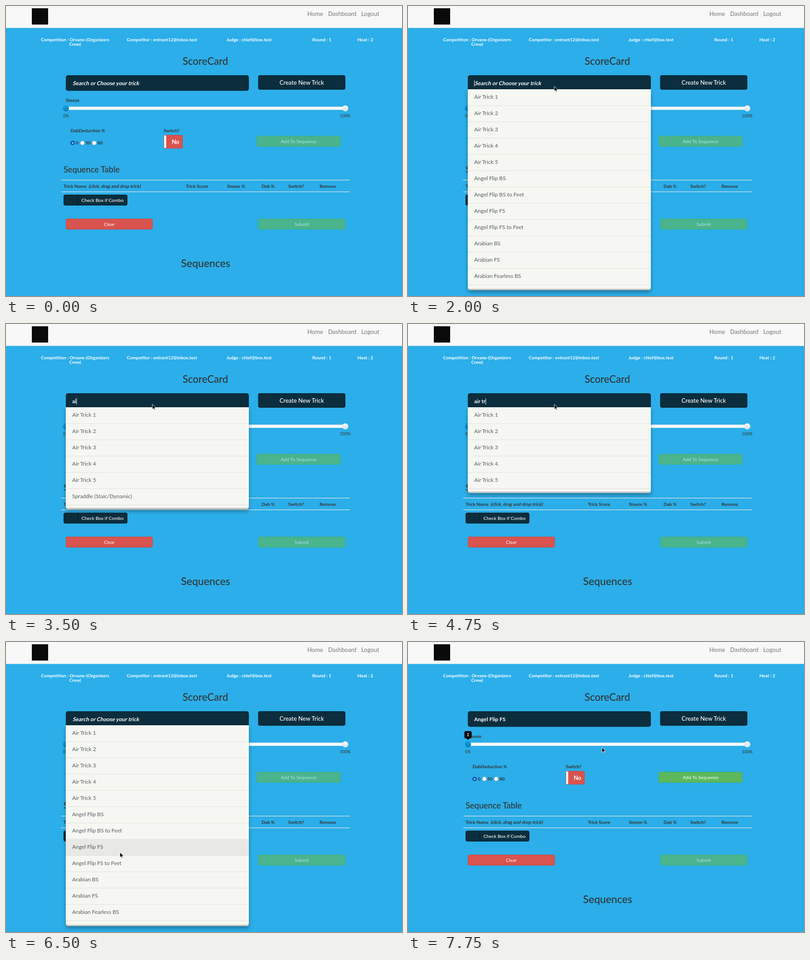
An HTML page for the animation above (8000 ms loop, 874 by 641 pixels).

```html
<!DOCTYPE html>
<html lang="en">
<head>
<meta charset="utf-8">
<title>ScoreCard</title>
<style>
  html, body { margin: 0; width: 100%; height: 100%; overflow: hidden; background: #2baee9; }
  svg { display: block; }
  text { font-family: Lato, "Open Sans", sans-serif; fill: #333; white-space: pre; }
</style>
</head>
<body>
<svg id="stage" width="874" height="641" viewBox="0 0 874 641">
  <defs>
    <linearGradient id="blueKnob" x2="0" y2="1"><stop stop-color="#149bdf"/><stop offset="1" stop-color="#0480be"/></linearGradient>
    <linearGradient id="greyKnob" x2="0" y2="1"><stop stop-color="#f4f6f7"/><stop offset="1" stop-color="#d3e3ec"/></linearGradient>
    <linearGradient id="track" x2="0" y2="1"><stop stop-color="#f3f3f3"/><stop offset="1" stop-color="#fff"/></linearGradient>
    <filter id="shadow" x="-10%" y="-10%" width="120%" height="125%">
      <feDropShadow dx="0" dy="5" stdDeviation="4.5" flood-color="#000" flood-opacity=".3"/>
    </filter>
  </defs>
</svg>
<script>
const NS = 'http://www.w3.org/2000/svg';
const stage = document.getElementById('stage');
const DARK = '#0c2d3d', RED = '#d9534f', GREEN = '#5cb85c';
const LOOP = 8000, ROW = 36, LIST_TOP = 184, MAX_ROWS = 12;

function add(tag, attrs, parent = stage) {
  const el = document.createElementNS(NS, tag);
  for (const key in attrs) el.setAttribute(key, attrs[key]);
  return parent.appendChild(el);
}
const group = (parent = stage) => add('g', {}, parent);
const rect = (x, y, width, height, fill, rx = 0, parent = stage, more = {}) =>
  add('rect', { x, y, width, height, fill, rx, ...more }, parent);
const circle = (cx, cy, r, fill, more = {}) => add('circle', { cx, cy, r, fill, ...more });

function label(x, y, size, content, attrs = {}, parent = stage) {
  const el = add('text', { x, y, 'font-size': size, ...attrs }, parent);
  el.textContent = content;
  return el;
}
const BOLD = { 'font-weight': 700 };
const MID = { 'text-anchor': 'middle' };
const paint = fill => ({ style: `fill:${fill}` });
const WHITE = paint('#fff');
const slanted = (x, y, size, content, attrs, parent) =>
  label(0, 0, size, content, { ...BOLD, ...attrs, transform: `translate(${x} ${y}) skewX(-13)` }, parent);

function button(x, y, width, height, fill, border, size, caption, weight = 400) {
  const g = group();
  rect(x + .5, y + .5, width - 1, height - 1, fill, 3, g, { stroke: border });
  label(x + width / 2, y + height / 2 + size * .36, size, caption, { ...MID, ...WHITE, 'font-weight': weight }, g);
  return g;
}
const show = (el, on) => el.setAttribute('visibility', on ? 'visible' : 'hidden');

// Navigation bar
rect(0, 0, 874, 641, '#2baee9');
rect(0, 0, 874, 48, '#f8f8f8');
rect(0, 48, 874, .6, '#d5e5ec');
rect(57, 5, 36, 36, '#0a0a0a');
[[665, 'Home'], [711, 'Dashboard'], [784, 'Logout']]
  .forEach(([x, s]) => label(x, 21.5, 13.1, s, paint('#777')));

// Heat details
[
  [152.5, 78, 'Competition : Orvane-(Organizers'], [152.5, 88, 'Crew)'],
  [344, 78, 'Competitor : entrant12@inbox.test'], [536.5, 78, 'Judge : chief@box.test'],
  [697, 78, 'Round : 1'], [793, 78, 'Heat : 2'],
].forEach(([x, y, s]) => label(x, y, 10, s, { ...MID, ...BOLD, ...WHITE }));

label(440, 130, 22.2, 'ScoreCard', { ...MID, 'font-weight': 500 });

// Search field
rect(132, 153, 404, 34.5, DARK, 5);
const field = group();
const placeholder = slanted(147, 175, 12, 'Search or Choose your trick', WHITE, field);
const entry = label(146, 175, 12, '', { ...BOLD, ...WHITE }, field);
const caret = rect(146, 164, 1, 14, '#fff', 0, field);
button(556.5, 153, 192.5, 32, DARK, '#08222f', 13, 'Create New Trick', 500);

// Steeze slider
label(132, 212, 10.2, 'Steeze', BOLD);
rect(132, 222.5, 617, 7, 'url(#track)', 3);
circle(132.3, 226.3, 6.8, 'url(#blueKnob)');
circle(748.7, 226.3, 6.8, 'url(#greyKnob)');
label(132.3, 246, 9.3, '0%', MID);
label(748.7, 246, 9.3, '100%', MID);

// Options
label(142.5, 279, 10.1, 'DabDeduction %', BOLD);
circle(147, 302.7, 4.9, '#0a58b8');
circle(147, 302.7, 1.5, '#fff');
[168.5, 194.7].forEach(x => circle(x, 302.7, 4.6, '#fff', { stroke: '#8a969c', 'stroke-width': .7 }));
[[154, '0'], [175, '50'], [202, '80']].forEach(([x, s]) => label(x, 306, 10.1, s, BOLD));
label(348, 279, 10.1, 'Switch?', BOLD);
rect(348.5, 285.5, 41, 29, RED, 3, stage, { stroke: '#c74a47' });
rect(349, 286, 4.5, 28, '#fff', 1.5);
label(374, 305, 12.5, 'No', { ...MID, ...BOLD, ...WHITE });
const addButton = button(553, 287, 185.5, 24, GREEN, '#4cae4c', 10.4, 'Add To Sequence');

// Sequence table
label(127, 368, 18.2, 'Sequence Table', { 'font-weight': 500 });
[384, 410].forEach(y => rect(122, y, 637, 1.4, '#d4dfe4'));
label(127, 401.5, 10.1, 'Trick Name', BOLD);
slanted(182, 401.5, 10.1, '(click, drag and drop trick)');
[[397, 'Trick Score'], [487.5, 'Steeze %'], [564, 'Dab %'], [623, 'Switch?'], [692, 'Remove']]
  .forEach(([x, s]) => label(x, 401.5, 10.1, s, BOLD));
rect(127.5, 417.5, 140, 23, DARK, 3, stage, { stroke: '#08222f' });
rect(158, 418, 1, 22, '#051821');
label(213, 432.7, 10.4, 'Check Box if Combo', { ...MID, ...WHITE, 'font-weight': 500 });
button(132, 470, 192, 24, RED, '#c74a47', 10.4, 'Clear');
button(556.5, 470, 192.5, 24, GREEN, '#4cae4c', 10.4, 'Submit').setAttribute('opacity', .65);
label(440.5, 577, 23, 'Sequences', { ...MID, 'font-weight': 500 });

// Slider tooltip
const tooltip = group();
rect(124.5, 197, 16, 16, '#06090b', 3, tooltip);
add('path', { d: 'M128.5 213h8l-4 3.5z', fill: '#06090b' }, tooltip);
label(132.3, 208.3, 9, '1', { ...MID, ...WHITE, 'font-weight': 700 }, tooltip);

// Suggestion list
const TRICKS = [
  ...[1, 2, 3, 4, 5].map(n => `Air Trick ${n}`),
  'Angel Flip BS', 'Angel Flip BS to Feet', 'Angel Flip FS', 'Angel Flip FS to Feet',
  'Arabian BS', 'Arabian FS', 'Arabian Fearless BS', 'Spraddle (Staic/Dynamic)',
];
const list = group();
const panel = add('path', { fill: '#c4c6c1', filter: 'url(#shadow)' }, list);
const sheet = add('path', { fill: '#f6f7f2' }, list);
const rows = Array.from({ length: MAX_ROWS }, (_, i) => {
  const g = group(list), y = LIST_TOP + i * ROW;
  const back = rect(132, y, 404, ROW, '#e8e9e4', 0, g);
  rect(132, y + ROW - .5, 404, 1, '#dfe1dc', 0, g);
  return { g, back, text: label(146, y + 21.3, 12, '', paint('#535c62'), g) };
});
const tray = bottom =>
  `M132 ${LIST_TOP}H536V${bottom - 5}q0 5 -5 5H137q-5 0 -5 -5z`;

const pointer = add('path', {
  d: 'M0 0V11.2L2.6 8.8L4.3 12.6L6.2 11.8L4.5 8H8.2Z',
  fill: '#000', stroke: '#fff', 'stroke-width': .9,
});

// Each step changes only the listed properties and holds until the next one.
const START = { at: null, query: '', open: false, caret: false, hover: -1, chosen: '', tip: false };
const STEPS = [
  [250, { at: [360, 63] }],
  [500, { at: [309, 102] }],
  [1500, { at: [336, 159] }],
  [1750, { at: [324, 177.5] }],
  [2000, { at: [323, 177.5], open: true, caret: true }],
  [2500, { caret: false }],
  [3000, { caret: true }],
  [3500, { query: 'ai' }],
  [3750, { query: 'air' }],
  [4000, { query: 'air t' }],
  [4250, { query: 'air tri' }],
  [4750, { query: 'air tr' }],
  [5000, { query: 'ai' }],
  [5250, { query: '' }],
  [6000, { at: [424, 413], hover: 6 }],
  [6250, { at: [147, 494] }],
  [6500, { at: [251.5, 465], hover: 7, caret: false }],
  [6750, { open: false, chosen: 'Angel Flip FS' }],
  [7000, { at: [307, 402] }],
  [7250, { at: [403, 320] }],
  [7500, { at: [425, 253] }],
  [7750, { at: [428, 233], tip: true }],
];

function render(time) {
  const s = { ...START };
  for (const [start, change] of STEPS) if (time >= start) Object.assign(s, change);

  const typed = s.chosen || s.query;
  entry.textContent = typed;
  show(placeholder, !typed);
  show(caret, s.caret);
  caret.setAttribute('x', 146 + (typed ? entry.getComputedTextLength() : 0));

  list.setAttribute('display', s.open ? 'inline' : 'none');
  const found = TRICKS.filter(name => name.toLowerCase().includes(s.query)).slice(0, MAX_ROWS);
  const bottom = LIST_TOP + found.length * ROW + (found.length === MAX_ROWS ? 12 : 9.5);
  panel.setAttribute('d', tray(bottom));
  sheet.setAttribute('d', tray(bottom - 3));
  rows.forEach((row, i) => {
    row.g.setAttribute('display', i < found.length ? 'inline' : 'none');
    row.back.setAttribute('opacity', i === s.hover ? 1 : 0);
    row.text.textContent = found[i] || '';
  });

  addButton.setAttribute('opacity', s.chosen ? 1 : .65);
  show(tooltip, s.tip);
  show(pointer, s.at);
  if (s.at) pointer.setAttribute('transform', `translate(${s.at})`);
}

const begin = performance.now();
function tick() {
  render((performance.now() - begin) % LOOP);
  requestAnimationFrame(tick);
}
tick();
</script>
</body>
</html>
```
